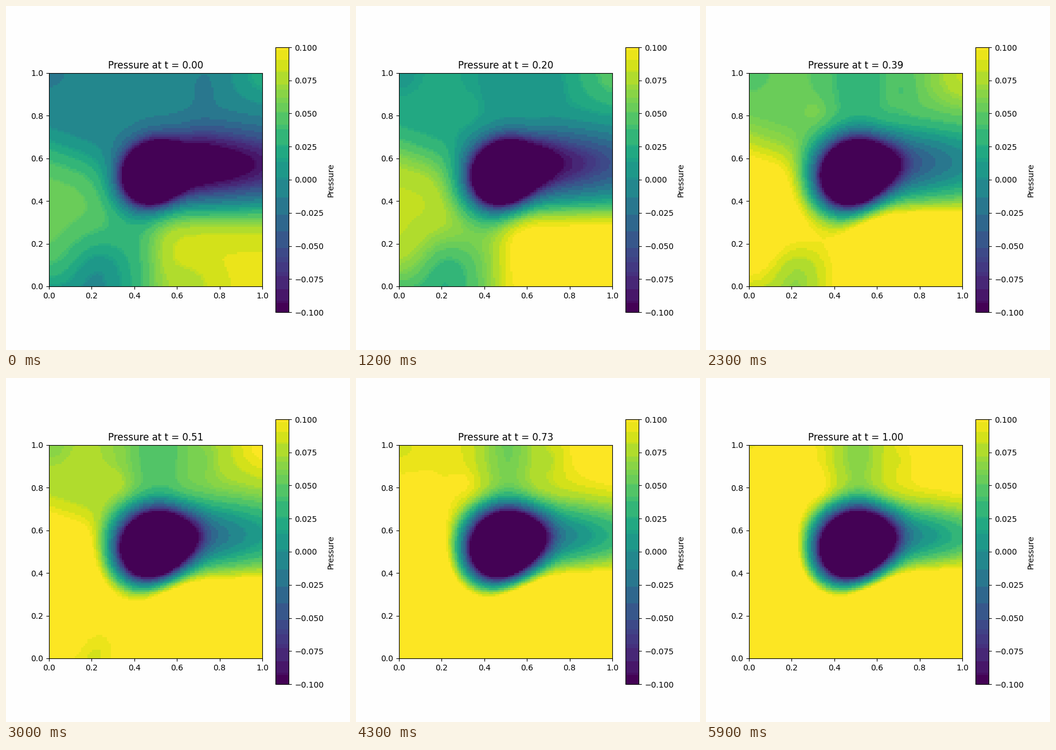
Animation of 600x600 px, one loop 6000 ms. Source, as a matplotlib script:

```python
import numpy as np
import matplotlib.pyplot as plt
from matplotlib.animation import FuncAnimation
from matplotlib.colors import ListedColormap

FRAMES, INTERVAL = 60, 100
GRID = 100

axis = np.linspace(0, 1, GRID)
X, Y = np.meshgrid(axis, axis)


def step(z):
    return 1 / (1 + np.exp(-z))


def radius2(x0, y0, sx, sy, tilt=0):
    """Squared distance in units of a tilted ellipse."""
    u, v = (X - x0) / sx, (Y - y0) / sy
    return u * u + v * v - 2 * tilt * u * v


def bump(*ellipse):
    return np.exp(-radius2(*ellipse))


def start_field():
    inflow = 0.063 * np.exp(-(X / 0.45) ** 4 - ((Y + 0.35 * X - 0.33) / 0.35) ** 4)
    trough = 0.046 * bump(0.22, 0.06, 0.15, 0.17)
    plateau = 0.1 * step((X - 0.48) / 0.05) * step((0.35 - Y) / 0.045)
    notch = 0.014 * bump(0.65, 0, 0.13, 0.1)
    core = 0.38 * bump(0.49, 0.526, 0.135, 0.13, 0.15)
    wake = (0.26 - 0.18 * X) * step((X - 0.65) / 0.04)
    wake = wake * np.exp(-((Y - 0.57) / 0.158) ** 2)
    top = (0.03 * bump(1.02, 1, 0.15, 0.15) + 0.008 * bump(0.31, 0.83, 0.06, 0.06)
           - 0.009 * bump(0.73, 0.93, 0.06, 0.1) - 0.01 * bump(0, 1, 0.08, 0.08))
    return inflow - trough + plateau - notch - core - wake + top - 0.008


def total_rise():
    """Pressure gained over the loop: even far out, held back by the core."""
    held = 1.3 * np.exp(-radius2(0.465, 0.53, 0.23, 0.23, 0.15) ** 2)
    column = 0.38 * np.exp(-((X - 0.51) / 0.16) ** 2) * step((Y - 0.8) / 0.03)
    return (0.115 + 0.015 * (1 - Y)) * (1 - held - column)


def banded_viridis():
    """Viridis averaged over coarse RGB cells, which gives uneven bands."""
    rgb = plt.get_cmap("viridis")(np.arange(256), bytes=True)[:, :3].astype(int)
    cell = (rgb // [32, 16, 32]) @ [1024, 32, 1]
    weight = np.ones(256)
    weight[[0, -1]] = 30, 60
    _, group = np.unique(cell, return_inverse=True)
    group = group.ravel()
    total = np.bincount(group, weight)
    mean = [np.bincount(group, weight * c) / total for c in rgb.T]
    return ListedColormap(np.floor(np.transpose(mean))[group] / 255)


start, rise = start_field(), total_rise()
# The wake settles faster than the rest
rate = 3.7 + 2 * bump(0.9, 0.55, 0.3, 0.12)


def pressure(t):
    return start + rise * (1 - np.exp(-rate * t ** 1.7)) / (1 - np.exp(-rate))


fig, ax = plt.subplots(figsize=(6, 6), dpi=100, facecolor="#fefefe")
image = ax.imshow(pressure(0), origin="lower", extent=(0, 1, 0, 1), vmin=-0.1,
                  vmax=0.1, cmap=banded_viridis(), interpolation="nearest")
fig.colorbar(image, ax=ax, label="Pressure")
title = ax.set_title("")


def update(i):
    t = i / (FRAMES - 1)
    image.set_data(pressure(t))
    title.set_text(f"Pressure at t = {t:.2f}")
    return image, title


anim = FuncAnimation(fig, update, frames=FRAMES, interval=INTERVAL,
                     repeat=True, repeat_delay=0)
plt.show()
```
